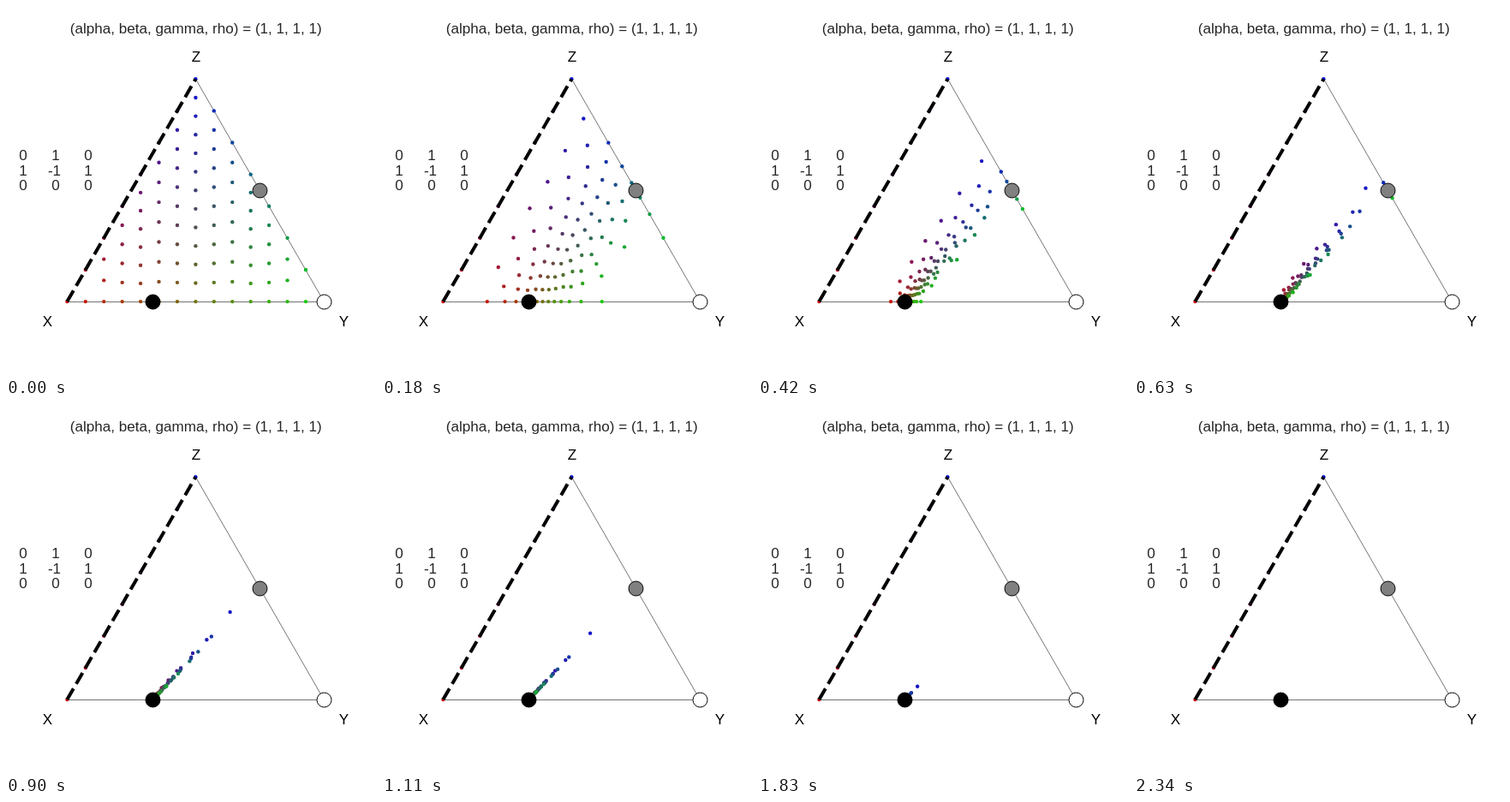
An HTML page for the animation above (3600 ms loop, 432 by 432 pixels).

```html
<!DOCTYPE html>
<html lang="en">
<head>
<meta charset="utf-8">
<title>Replicator dynamics on a simplex</title>
<style>
  html, body { margin: 0; height: 100%; overflow: hidden; background: #fff; }
  svg { display: block; width: 100vw; height: 100vh; }
  text { font: 17.1px "Liberation Sans", Arial, sans-serif; text-anchor: middle; fill: #262626; }
  .corner text { fill: #000; }
</style>
</head>
<body>
<svg viewBox="0 0 432 432">
  <path d="M71.4 345.5H371.4L221.4 85.2" fill="none" stroke="#000" stroke-width=".55"/>
  <g id="dots"></g>
  <path d="M71.4 345.1L221.4 85.2" stroke="#000" stroke-width="4" stroke-dasharray="14.8 6.4"/>
  <g stroke="#000">
    <circle cx="171.5" cy="345.5" r="8.5"/>
    <circle cx="296.5" cy="215.5" r="8.5" fill="#808080"/>
    <circle cx="371.5" cy="345.5" r="8.5" fill="#fff"/>
  </g>
  <text x="221.8" y="32">(alpha, beta, gamma, rho) = (1, 1, 1, 1)</text>
  <g class="corner">
    <text x="48.5" y="374">X</text>
    <text x="394.5" y="374">Y</text>
    <text x="222" y="65">Z</text>
  </g>
  <text x="20" y="180">0</text><text x="58" y="180">1</text><text x="96" y="180">0</text>
  <text x="20" y="198">1</text><text x="56.5" y="198">-1</text><text x="96" y="198">1</text>
  <text x="20" y="215">0</text><text x="58" y="215">0</text><text x="96" y="215">0</text>
</svg>
<script>
const LOOP = 3600, TICK = 30, STEPS = 78, SPAN = 20;
const SIDE = 300, LEFT = 71.4, BASE = 345.1, HEIGHT = SIDE * Math.sqrt(3) / 2;
const group = document.getElementById("dots");

// Replicator equation for payoffs [0 1 0], [1 -1 1], [0 0 0], with z = 1 - x - y
function slope([x, y]) {
  const mean = y * (1 + x - 2 * y);
  return [x * (y - mean), y * (1 - 2 * y - mean)];
}

function advance(p, h) {
  const shift = (d, s) => [p[0] + d[0] * s, p[1] + d[1] * s];
  const a = slope(p), b = slope(shift(a, h / 2)), c = slope(shift(b, h / 2)), d = slope(shift(c, h));
  return p.map((v, i) => v + h / 6 * (a[i] + 2 * b[i] + 2 * c[i] + d[i]));
}

function makeDot(x, y) {
  const path = [[x, y]];
  for (let k = 0; k < STEPS; k++) path.push(advance(path[k], SPAN / STEPS));
  const el = document.createElementNS("http://www.w3.org/2000/svg", "circle");
  el.setAttribute("r", 2.2);
  el.setAttribute("fill", `rgb(${[x, y, 1 - x - y].map(v => Math.round(14 + 200 * v))})`);
  group.append(el);
  return { el, path };
}

// Fifteen columns, each split evenly from the base up to the triangle's side
const dots = [];
for (let col = 0; col <= 14; col++) {
  const rise = Math.min(col, 14 - col), rows = Math.floor(rise * 1.75);
  for (let row = 0; row <= rows; row++) {
    const z = rows ? rise / 7 * row / rows : 0;
    const y = col / 14 - z / 2;
    dots.push(makeDot(1 - y - z, y));
  }
}

function draw(now) {
  let k = Math.min(Math.floor(now % LOOP / TICK), STEPS);
  if (k && k % 31 === 0) k--; // two ticks repeat the previous pose
  for (const { el, path } of dots) {
    const [x, y] = path[k], z = 1 - x - y;
    el.setAttribute("cx", LEFT + SIDE * (y + z / 2));
    el.setAttribute("cy", BASE - HEIGHT * z);
  }
}

const start = performance.now();
function loop() {
  draw(performance.now() - start);
  requestAnimationFrame(loop);
}
loop();
</script>
</body>
</html>
```
